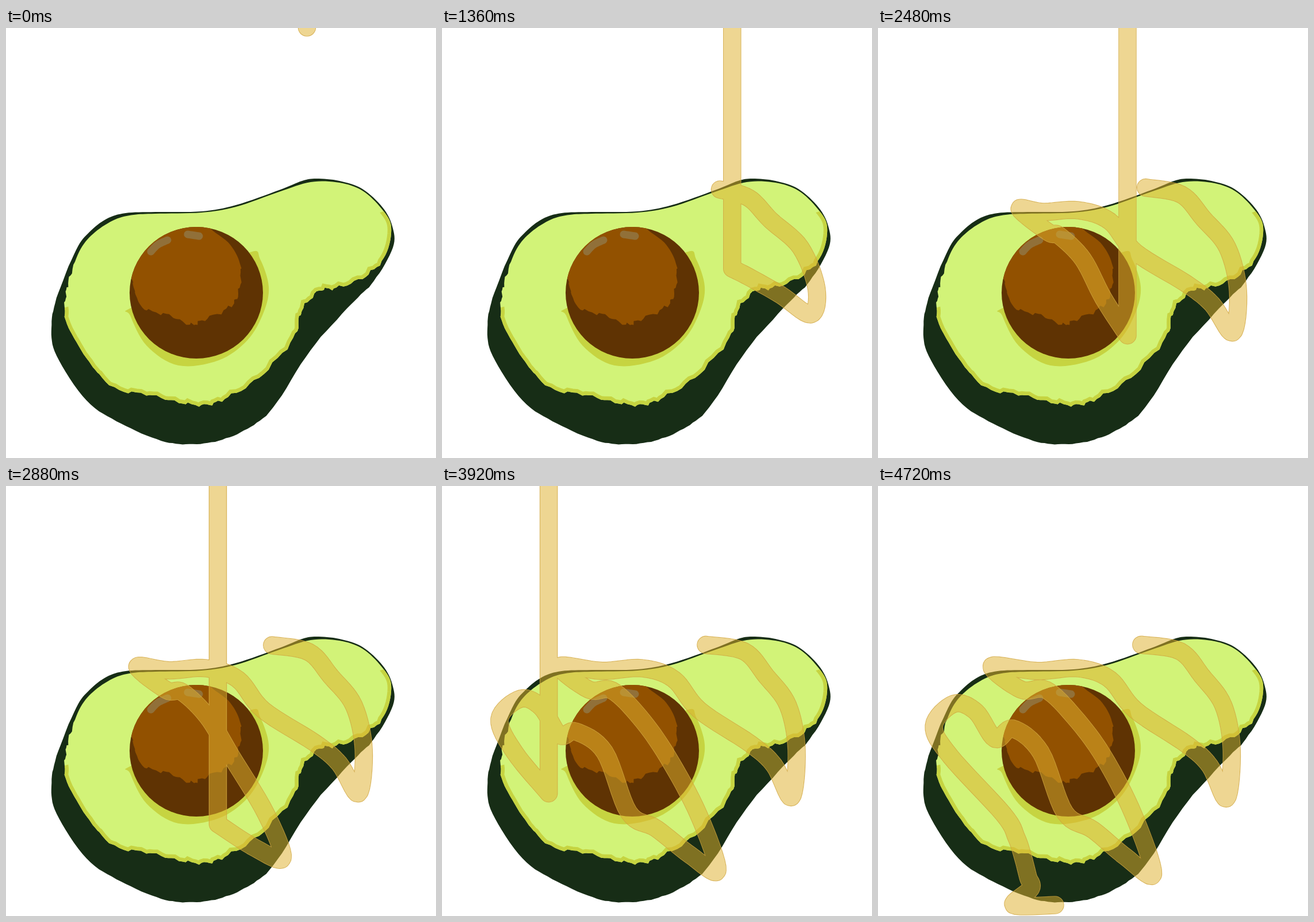
Animation of 748 by 748 pixels, one loop 4.8 s. Source, as an HTML page with a canvas:

```html
<!DOCTYPE html>
<html lang="en">
<head>
<meta charset="utf-8">
<title>Avocado with oil</title>
<style>
html, body { margin: 0; width: 748px; height: 748px; overflow: hidden; background: #fff; }
canvas { position: absolute; left: 0; top: 0; }
</style>
</head>
<body>
<canvas id="fruit" width="748" height="748"></canvas>
<canvas id="oil" width="748" height="748"></canvas>
<script>
const fruit = document.getElementById('fruit').getContext('2d');
const oil = document.getElementById('oil').getContext('2d');
const mixPoint = (p, q, u) => p.map((v, i) => v + (q[i] - v) * u);
const points = text => text.trim().split(/\s+/).map(p => p.split(',').map(Number));

// Catmull-Rom curve through the points; rough makes its lower edge ragged
function curve(pts, { closed = false, rough = 0 } = {}) {
  const n = pts.length, path = new Path2D(), samples = 8;
  const at = i => closed ? pts[(i + n) % n] : pts[Math.max(0, Math.min(n - 1, i))];
  for (let k = 0; k <= (closed ? n : n - 1) * samples; k++) {
    const i = Math.floor(k / samples), u = k / samples - i;
    const [a, b, c, d] = [at(i - 1), at(i), at(i + 1), at(i + 2)];
    const [x, y] = [0, 1].map(j => b[j] + u / 2 * (c[j] - a[j]
      + u * (2 * a[j] - 5 * b[j] + 4 * c[j] - d[j] + u * (3 * (b[j] - c[j]) + d[j] - a[j]))));
    const bump = y > 410 ? rough * (Math.sin(k * 1.3) + Math.sin(k * 2.9) / 2) : 0;
    path.lineTo(x + bump / 2, y + bump);
  }
  return path;
}

function blob(text, color, rough) {
  const path = curve(points(text), { closed: true, rough });
  fruit.fillStyle = color;
  fruit.fill(path);
  return path;
}

function drawFruit() {
  const rim = '#c6d441';
  blob(`208,322 260,320 340,319 400,308 475,282 515,266 540,262 580,266 620,280 655,312 672,345
    673,382 640,440 600,481 530,560 465,660 420,697 370,718 319,724 270,718 200,688 140,648
    88,570 79,522 88,470 122,386 145,355 175,332`, '#172d16', 0.4);
  const flesh = blob(`222,325 260,323 340,321 400,311 475,285 530,268 580,269 620,283 653,314 670,346
    660,395 625,432 575,452 545,457 514,492 500,540 440,608 380,645 345,656 300,651 250,638
    190,627 150,588 120,542 103,505 104,465 112,430 130,384 155,355 190,333`, '#d2f378', 2);

  // Rim along the lower side only
  fruit.save();
  fruit.clip(flesh);
  fruit.clip(new Path2D('M90 490L680 312V748H0Z'));
  fruit.strokeStyle = rim;
  fruit.lineWidth = 13;
  fruit.stroke(flesh);
  fruit.restore();

  blob('425,390 442,402 457,450 448,495 420,543 370,578 300,587 245,553 216,500 217,487 330,440', rim);
  const seed = new Path2D();
  seed.ellipse(331, 460.5, 116, 114.5, 0, 0, 7);
  fruit.fillStyle = '#5f3303';
  fruit.fill(seed);
  fruit.save();
  fruit.clip(seed);
  blob(`357,350 390,377 408,415 404,462 388,486 345,507 320,516 285,500 240,488 225,462
    218,435 200,420 200,330 330,320`, '#925100', 2.5);
  fruit.restore();

  fruit.strokeStyle = '#917039';
  fruit.lineWidth = 13;
  fruit.lineCap = 'round';
  fruit.stroke(curve(points('252,389 264,377 281,369')));
  fruit.stroke(curve(points('316,359 336,362')));
}

// Key points of the settled thread: x, y and, where it slides, the offset on landing
const knots = points(`457,276,64,12 525,287,18,18 563,330,16.5,8 600,382,40,0 614,460,56,-10
  605,545,48,-62 577,488,14,-28 537,450,-4,-18 448,390 403,336 348,317 275,322,25,-4
  192,313,95,3 243,354,83,2 290,354,35,10 340,402,20,0 392,470 443,572,12,-5 478,681,4,-43
  430,648,5,-20 375,600,-6.5,-12 325,568 283,463 236,418,-6,18 203,445,3,-20 168,398,7,-20
  128,386,12,-22 95,427,6,-26 125,475,2,-12 222,573,-7,-3 241,612 252,645 261,680 266,700
  236,729 308,729`);
const landTime = 480, knotTime = 120, settleTime = 1000, cutTime = 4480, fallSpeed = 3;
const dripStart = [523.5, -1], lastFed = 33;

function knotAt(i, age) {
  const [x, y, dx = 0, dy = 0] = knots[Math.min(i, knots.length - 1)];
  const slide = Math.exp(-Math.max(0, age) / settleTime);
  return [x + dx * slide, y + dy * slide];
}

function drawOil(t) {
  const reach = Math.min((t - landTime) / knotTime, knots.length - 1);
  const knot = i => knotAt(i, t - landTime - i * knotTime);
  const along = s => s < 0
    ? mixPoint(knot(0), dripStart, -s * knotTime / landTime)
    : mixPoint(knot(Math.floor(s)), knot(Math.floor(s) + 1), s % 1);
  const landed = Array.from({ length: Math.max(0, Math.ceil(reach)) }, (_, i) => knot(i));
  const thread = curve([...landed, along(reach)]);

  const [x, y] = along(Math.min(reach, lastFed));
  const top = Math.max(0, (t - cutTime) * fallSpeed);
  if (top < y) {
    thread.moveTo(x, top || -20);
    thread.lineTo(x, y);
  }

  oil.clearRect(0, 0, 748, 748);
  oil.lineCap = oil.lineJoin = 'round';
  const brush = (width, color, mode = 'source-over') => {
    oil.globalCompositeOperation = mode;
    oil.lineWidth = width;
    oil.strokeStyle = color;
    oil.stroke(thread);
  };
  brush(31.5, 'rgba(211,167,60,.85)');
  brush(29, '#000', 'destination-out');
  brush(29, 'rgba(222,176,46,.52)');
}

function tick() {
  let step = Math.floor(performance.now() % 4800 / 80);
  if (step === 27 || step === 42) step--; // two short rests
  drawOil(step * 80);
  requestAnimationFrame(tick);
}

drawFruit();
tick();
</script>
</body>
</html>
```
